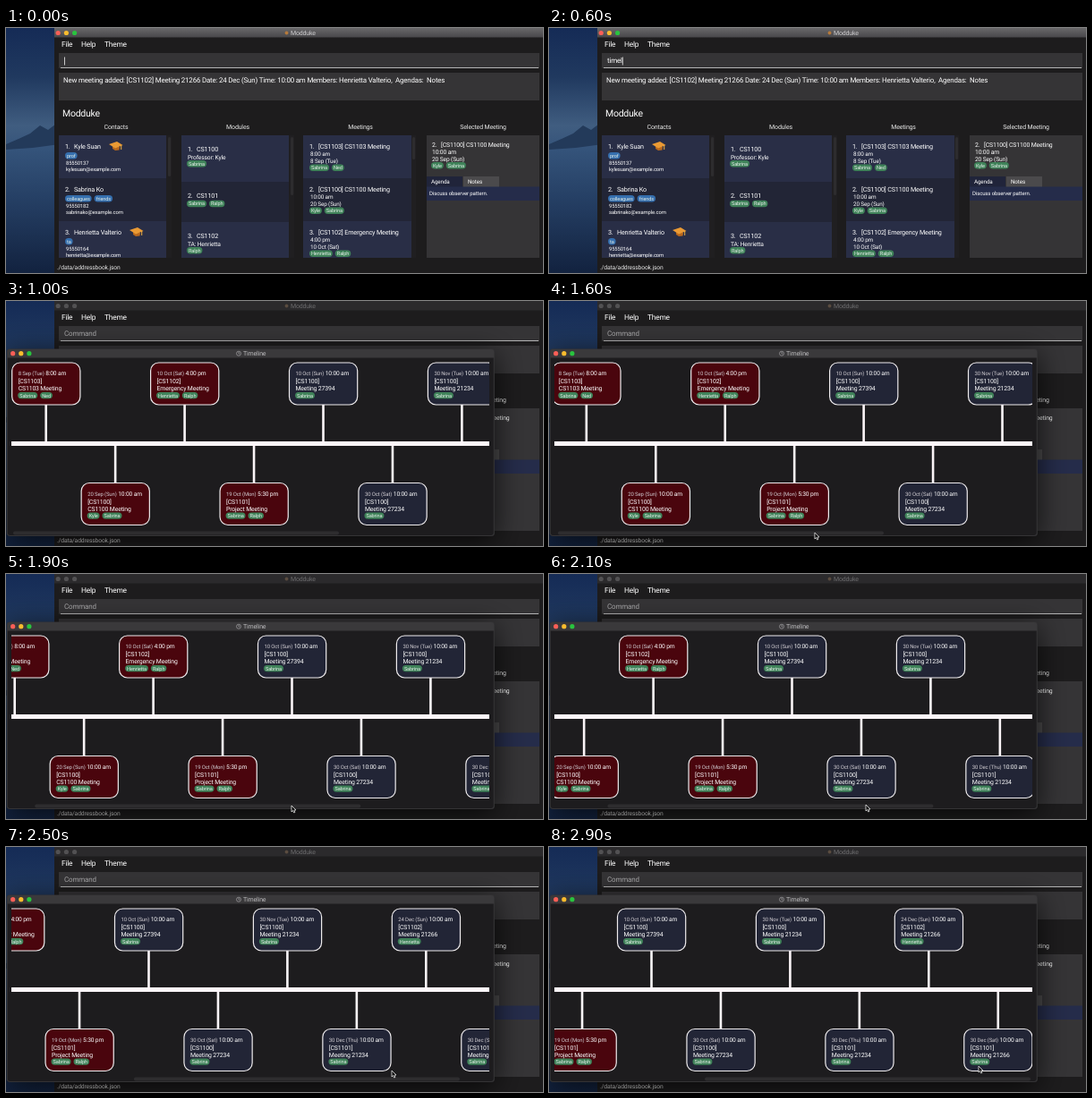
An HTML page with a canvas that plays this animation: 600x274 px, repeating every 3000 ms.

```html
<!DOCTYPE html>
<html lang="en">
<head>
<meta charset="utf-8">
<title>Modduke</title>
<style>
  html, body { margin: 0; width: 100%; height: 100%; overflow: hidden; background: #1d1c1d; }
  canvas { display: block; width: 600px; height: 274px; }
</style>
</head>
<body>
<canvas id="stage"></canvas>
<script>
const LOOP = 3000, STEP = 100, OPEN_AT = 1000, POINTER_AT = 1400;
const canvas = document.getElementById('stage');
const ctx = canvas.getContext('2d');
const dpr = window.devicePixelRatio || 1;
canvas.width = 600 * dpr;
canvas.height = 274 * dpr;

const BLUE = '#356fae', GREEN = '#3f8259';
const PANEL = '#353436', CARDS = ['#292e46', '#222536'];

function rect(x, y, w, h, fill) {
  ctx.fillStyle = fill;
  ctx.fillRect(x, y, w, h);
}

function pill(x, y, w, h, r, fill, stroke) {
  ctx.beginPath();
  ctx.roundRect(x, y, w, h, r);
  ctx.fillStyle = fill;
  ctx.fill();
  if (stroke) {
    ctx.strokeStyle = stroke;
    ctx.lineWidth = 1.2;
    ctx.stroke();
  }
}

function dot(x, y, r, fill) {
  ctx.beginPath();
  ctx.arc(x, y, r, 0, 7);
  ctx.fillStyle = fill;
  ctx.fill();
}

function poly(points, fill, stroke) {
  ctx.beginPath();
  points.forEach(([x, y]) => ctx.lineTo(x, y));
  ctx.closePath();
  ctx.fillStyle = fill;
  ctx.fill();
  if (stroke) {
    ctx.strokeStyle = stroke;
    ctx.lineWidth = 0.8;
    ctx.stroke();
  }
}

function gradient(height, stops) {
  const g = ctx.createLinearGradient(0, 0, 0, height);
  stops.forEach(([at, color]) => g.addColorStop(at, color));
  return g;
}

function textWidth(str, size) {
  ctx.font = `${size}px Roboto, sans-serif`;
  ctx.letterSpacing = `${-0.023 * size}px`;
  ctx.textRendering = 'geometricPrecision';
  return ctx.measureText(str).width;
}

// y is the middle of the capitals; returns the width
function text(str, x, y, size, fill = '#fff', align = 'left') {
  const width = textWidth(str, size);
  ctx.textAlign = align;
  ctx.fillStyle = fill;
  ctx.fillText(str, x, y + size * 0.355);
  return width;
}

function tags(names, x, y, color) {
  for (const name of names) {
    const w = textWidth(name, 5.6) + 4;
    pill(x, y - 3.7, w, 7.4, 3.7, color);
    text(name, x + 2, y, 5.6, '#e4eee8');
    x += w + 3;
  }
}

function trafficLights(x, y, gap, active) {
  ['#f95f57', '#f9bc2e', '#29c33f'].forEach((c, i) => dot(x + i * gap, y, 2.6, active ? c : '#525153'));
}

function gradCap(x, y) {
  poly([[x - 4, y], [x + 4, y + 1], [x + 3.5, y + 4.5], [x - 1, y + 5], [x - 4, y + 3]], '#b9681c');
  poly([[x - 8, y - 2], [x + 1, y - 5], [x + 7.5, y - 1], [x - 1, y + 2.5]], '#ea9a34');
  rect(x + 5.2, y - 1, 1, 5, '#f0b040');
}

function desktop() {
  rect(0, 0, 60, 274, gradient(274, [[0, '#152b56'], [0.2, '#20395f'], [0.4, '#405d80'],
    [0.5, '#34537a'], [0.7, '#253f64'], [1, '#12223f']]));
  poly([[0, 130], [14, 124], [27, 118], [38, 109], [47, 114], [60, 104], [60, 130], [30, 134], [0, 136]], '#233a5a');
}

const contacts = [
  ['Kyle Suan', ['prof'], '85550137', 'kylesuan@example.com', 123],
  ['Sabrina Ko', ['colleagues', 'friends'], '95550182', 'sabrinako@example.com'],
  ['Henrietta Valterio', ['ta'], '95550164', 'henrietta@example.com', 146],
];
const modules = [
  ['CS1100', 'Professor: Kyle', ['Sabrina'], 120],
  ['CS1101', '', ['Sabrina', 'Ralph'], 172],
  ['CS1102', 'TA: Henrietta', ['Ralph'], 217],
];
const meetings = [
  ['[CS1103] CS1103 Meeting', '8:00 am', '8 Sep (Tue)', ['Sabrina', 'Ned']],
  ['[CS1100] CS1100 Meeting', '10:00 am', '20 Sep (Sun)', ['Kyle', 'Sabrina']],
  ['[CS1102] Emergency Meeting', '4:00 pm', '10 Oct (Sat)', ['Henrietta', 'Ralph']],
];

function lists() {
  [['Contacts', 123], ['Modules', 259], ['Meetings', 396], ['Selected Meeting', 533]]
    .forEach(([title, x]) => text(title, x, 111, 7, '#e8e8e8', 'center'));

  ctx.save();
  ctx.beginPath();
  ctx.rect(59, 120, 537, 137);
  ctx.clip();
  [[59, 44], [196, 65], [332, 25]].forEach(([x, thumb]) => {
    rect(x, 120, 126, 137, '#201f21');
    pill(x + 122, 122, 3.2, thumb, 1.6, '#2d2c2e');
  });

  contacts.forEach(([name, labels, phone, email, capX], i) => {
    const y = 120 + i * 48;
    rect(59, y, 120, 48, CARDS[i % 2]);
    text(i + 1 + '.', 66, y + 12.3, 7.2);
    text(name, 76, y + 12.3, 7.2);
    tags(labels, 66, y + 22.8, BLUE);
    text(phone, 67, y + 30.6, 5.9);
    text(email, 67, y + 38.2, 5.9);
    if (capX) gradCap(capX, y + 12);
  });

  modules.forEach(([code, staff, names, y], i) => {
    rect(196, y, 120, 52, CARDS[i % 2]);
    text(i + 1 + '.', 203, y + 15, 7.2);
    text(code, 213, y + 15, 7.2);
    text(staff, 203, y + 24.5, 6.7);
    tags(names, 202, y + (staff ? 31.8 : 24.5), GREEN);
  });

  meetings.forEach(([title, time, date, names], i) => {
    const y = 120 + i * 48;
    rect(332, y, 121, 48, CARDS[i % 2]);
    text(i + 1 + '.', 339, y + 12.3, 7.2);
    text(title, 349, y + 12.3, 7.2);
    text(time, 340, y + 20.7, 6.4);
    text(date, 340, y + 28.7, 6.4);
    tags(names, 339, y + 36.2, GREEN);
  });

  const [title, time, date, names] = meetings[1];
  rect(470, 120, 126, 137, PANEL);
  text('2.', 476, 131, 6.9);
  text(title, 486, 131, 6.9);
  text(time, 476, 138.8, 6.8);
  text(date, 476, 146.3, 6.7);
  tags(names, 475, 153.7, GREEN);
  rect(470, 166, 40, 12, '#20243a');
  rect(511, 166, 40, 12, '#4b4a4c');
  text('Agenda', 475, 172, 6.3);
  text('Notes', 516, 172, 6.3);
  rect(470, 177.5, 126, 15.5, '#252c4a');
  text('Discuss observer pattern.', 473, 185, 6.05);
  ctx.restore();
}

function mainWindow(t) {
  const active = t < OPEN_AT;
  const typed = 'timeline'.slice(0, Math.max(0, t / STEP - 1));
  rect(54, 0, 546, 274, '#1d1c1d');
  rect(54, 0, 546, 10.5, active ? gradient(10.5, [[0, '#69686a'], [1, '#48474a']]) : '#2b2a2c');
  trafficLights(58.2, 5.5, 9.2, active);
  dot(313.5, 5.5, 1.9, active ? '#b57a3c' : '#5a4c40');
  text('Modduke', 318, 5.5, 7, active ? '#cfced0' : '#6c6b6d');
  [['File', 62], ['Help', 84], ['Theme', 110]].forEach(([label, x]) => text(label, x, 18, 8.4));

  rect(59, 28, 537, 17, PANEL);
  rect(61, 44, 534, 1, '#b4b4b4');
  if (active) {
    const w = text(typed, 65, 36.5, 8);
    rect(65 + w, 32.5, 0.8, 9, '#f2f2f2');
  } else {
    text('Command', 65, 36.5, 8, '#a9a8aa');
  }

  rect(59, 50, 537, 31, PANEL);
  if (active) {
    text('New meeting added: [CS1102] Meeting 21266 Date: 24 Dec (Sun) Time: 10:00 am ' +
      'Members: Henrietta Valterio,  Agendas:  Notes', 64, 58, 7.92);
  }
  text('Modduke', 63, 95.5, 10.5);
  lists();
  text('./data/addressbook.json', 57, 268, 6.75, '#e4e4e4');
}

const events = [
  ['8 Sep (Tue)', '8:00 am', 'CS1103', 'CS1103 Meeting', ['Sabrina', 'Ned']],
  ['20 Sep (Sun)', '10:00 am', 'CS1100', 'CS1100 Meeting', ['Kyle', 'Sabrina']],
  ['10 Oct (Sat)', '4:00 pm', 'CS1102', 'Emergency Meeting', ['Henrietta', 'Ralph']],
  ['19 Oct (Mon)', '5:30 pm', 'CS1101', 'Project Meeting', ['Sabrina', 'Ralph']],
  ['10 Oct (Sun)', '10:00 am', 'CS1100', 'Meeting 27394', ['Sabrina']],
  ['30 Oct (Sat)', '10:00 am', 'CS1100', 'Meeting 27234', ['Sabrina']],
  ['30 Nov (Tue)', '10:00 am', 'CS1100', 'Meeting 21234', ['Sabrina']],
  ['30 Dec (Thu)', '10:00 am', 'CS1101', 'Meeting 21234', ['Sabrina']],
  ['24 Dec (Sun)', '10:00 am', 'CS1102', 'Meeting 21266', ['Henrietta']],
  ['30 Dec (Sat)', '10:00 am', 'CS1101', 'Meeting 21266', ['Sabrina']],
];

function timelineWindow(scroll) {
  ctx.save();
  ctx.shadowColor = 'rgba(0, 0, 0, 0.75)';
  ctx.shadowBlur = 32 * dpr;
  ctx.shadowOffsetY = 6 * dpr;
  pill(1.3, 54, 544, 208.5, 3, '#1d1c1e');
  ctx.restore();
  pill(1.3, 54, 544, 208.5, 3, '#1d1c1e', '#343335');
  pill(1.3, 54, 544, 9.5, [3, 3, 0, 0], '#3a393b');
  trafficLights(7.7, 58.7, 9.1, true);
  ctx.beginPath();
  ctx.arc(260, 58.7, 2.5, 0, 7);
  ctx.moveTo(260, 57);
  ctx.lineTo(260, 58.9);
  ctx.lineTo(261.3, 58.9);
  ctx.strokeStyle = '#a5a4a6';
  ctx.lineWidth = 0.7;
  ctx.stroke();
  text('Timeline', 265, 58.7, 7, '#bdbcbe');

  ctx.save();
  ctx.beginPath();
  ctx.rect(6, 63.5, 534, 199);
  ctx.clip();
  events.forEach(([date, time, code, title, names], i) => {
    const x = 6 + i * 77.45 - scroll;
    const lower = i % 2;
    const y = lower ? 203.5 : 69;
    rect(x + 37.4, lower ? 160 : 115, 2.6, 44, '#fbf5f8');
    pill(x + 0.7, y, 76.2, 47, 9, i < 4 ? '#4a050d' : '#222536', '#efecee');
    const w = text(date, x + 7.7, y + 11.9, 6, '#cfcbd0');
    text(time, x + 9.3 + w, y + 11.9, 6.7);
    text('[' + code + ']', x + 7.7, y + 21, 6.9);
    text(title, x + 7.7, y + 29, 6.9);
    tags(names, x + 7.2, y + 36.6, GREEN);
  });
  rect(6, 157, 534, 5, '#fdf6fa');
  ctx.restore();
  pill(8 + scroll * 0.692, 257.5, 364, 4, 2, '#2e2d2f');
}

// time, scroll, pointer x, pointer y
const drag = [
  [1500, 0, 295, 259],
  [1900, 35, 319, 259],
  [2100, 83, 354, 258],
  [2500, 195, 431, 250],
  [2900, 240, 480, 245],
];

function slope(i, k) {
  if (i === 0 || i === drag.length - 1) return 0;
  return (drag[i + 1][k] - drag[i - 1][k]) / (drag[i + 1][0] - drag[i - 1][0]);
}

// Cubic Hermite through the drag keys
function dragValue(t, k) {
  const last = drag.length - 1;
  if (t <= drag[0][0]) return drag[0][k];
  if (t >= drag[last][0]) return drag[last][k];
  const i = drag.findIndex(key => key[0] > t) - 1;
  const a = drag[i], b = drag[i + 1];
  const span = b[0] - a[0], u = (t - a[0]) / span;
  return a[k] + (b[k] - a[k]) * u * u * (3 - 2 * u) +
    span * u * (1 - u) * (slope(i, k) * (1 - u) - slope(i + 1, k) * u);
}

function pointer(x, y) {
  poly([[0, 0], [0, 7], [1.6, 5.6], [2.7, 8], [3.9, 7.5], [2.9, 5.1], [5, 5]]
    .map(([dx, dy]) => [x + dx, y + dy]), '#080808', '#e8e8e8');
}

function draw(now) {
  const t = Math.floor((now % LOOP) / STEP) * STEP;
  ctx.setTransform(dpr, 0, 0, dpr, 0, 0);
  desktop();
  mainWindow(t);
  if (t >= OPEN_AT) timelineWindow(dragValue(t, 1));
  if (t >= POINTER_AT) pointer(dragValue(t, 2), dragValue(t, 3));
}

const start = performance.now();
function tick() {
  draw(performance.now() - start);
  requestAnimationFrame(tick);
}
tick();
</script>
</body>
</html>
```
